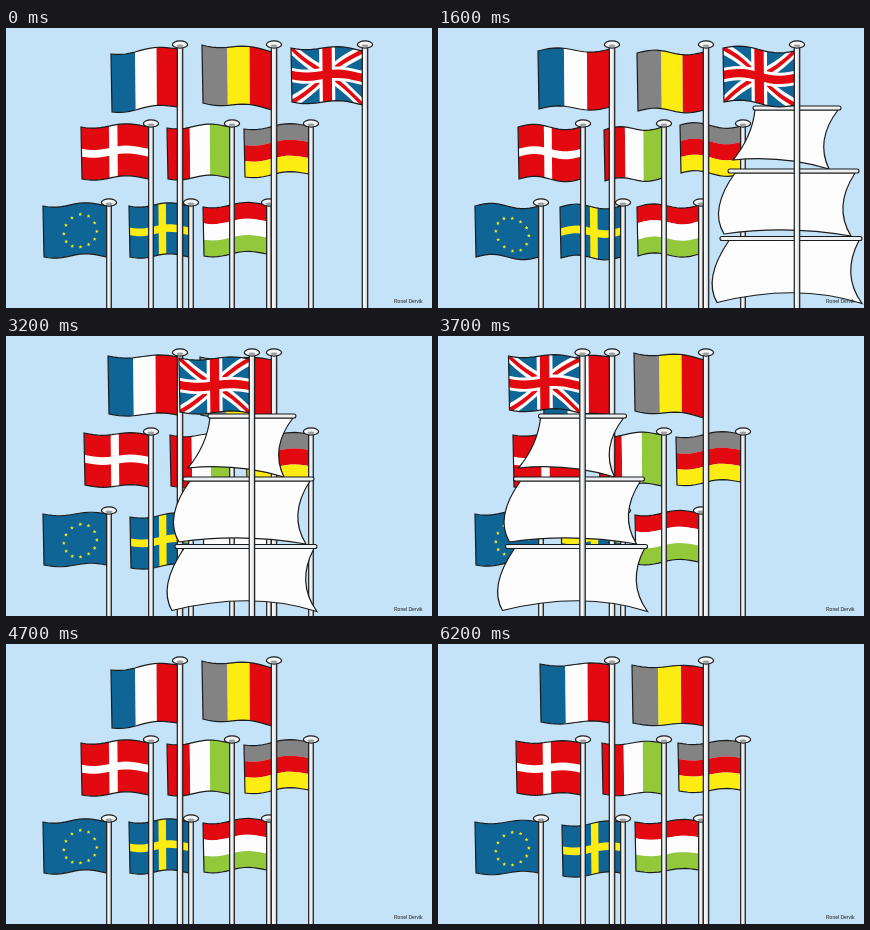
An HTML page with a canvas that plays this animation: 426 by 280 pixels, repeating every 6.3 s.

```html
<!DOCTYPE html>
<html lang="en">
<head>
<meta charset="utf-8">
<title>Flags and ship</title>
<style>
  html, body { margin: 0; width: 100%; height: 100%; overflow: hidden; background: #c4e2f8; }
  canvas { display: block; width: 426px; height: 280px; }
</style>
</head>
<body>
<canvas id="stage" width="426" height="280"></canvas>
<script>
const ctx = document.getElementById('stage').getContext('2d');
const LOOP = 6300, STEP = 100;
const SKY = '#c4e2f8', INK = '#1b1b1b', WHITE = '#fdfdfd', BLUE = '#0f6596', RED = '#e20a10',
      YELLOW = '#fcec12', GRAY = '#838383', GREEN = '#93c83a';

// Three cloth shapes: wave height, phase, slant of the free edge
const POSES = [
  { amp: 2.2, phase: 0.5, skew: 1 },
  { amp: 1.8, phase: 0, skew: 1 },
  { amp: -2.6, phase: 0, skew: 1 }
];

// free: corner of the free end for each pose; drawn from back to front
const FLAGS = [
  { pole: 103, cap: 175, top: 178, h: 51, free: [[37, 178], [37, 178], [37, 178]], art: europe },
  { pole: 185, cap: 175, top: 178, h: 51, free: [[123, 178], [124, 181], [122, 179]], art: f => cross(f, BLUE, YELLOW, 0.49) },
  { pole: 263, cap: 175, top: 177, h: 49, free: [[197, 179], [197, 178], [199, 179]], art: f => rows(f, [RED, WHITE, GREEN]) },
  { pole: 145, cap: 96, top: 99, h: 52, free: [[75, 99], [78, 97], [80, 99]], art: f => cross(f, RED, WHITE, 0.41) },
  { pole: 226, cap: 96, top: 99, h: 51, free: [[161, 100], [164, 99], [166, 102]], art: f => columns(f, [RED, WHITE, GREEN]) },
  { pole: 305, cap: 96, top: 98, h: 48, free: [[238, 101], [240, 99], [242, 97]], art: f => rows(f, [GRAY, RED, YELLOW]) },
  { pole: 174, cap: 17, top: 21, h: 58, free: [[105, 26], [102, 20], [100, 23]], art: f => columns(f, [BLUE, WHITE, RED]) },
  { pole: 268, cap: 17, top: 24, h: 58, free: [[196, 17], [194, 21], [199, 25]], art: f => columns(f, [GRAY, YELLOW, RED]) }
];
const SHIP_FLAG = { pole: 359, cap: 17, top: 23, h: 54, free: [[285, 20], [286, 22], [285, 20]], art: union };

// Yards relative to the mast, with the curves of the sail below
const YARDS = [
  { y: 80, l: -44, r: 44, delay: 0, sail: { tl: -42, belly: [-45, 27], bl: [-64, 50], dip: [-15, 45], br: [32, 59], bend: [18, 30], tr: 41 } },
  { y: 143, l: -69, r: 62, delay: 0, sail: { tl: -62, belly: [-88, 36], bl: [-73, 61], dip: [-10, 52], br: [54, 63], bend: [36, 34], tr: 58 } },
  { y: 210.5, l: -77, r: 65, delay: 65, sail: { tl: -68, belly: [-94, 38], bl: [-80, 62], dip: [0, 42], br: [65, 63], bend: [44, 34], tr: 62 } }
];

const clamp = v => Math.max(0, Math.min(1, v));

function poseAt(t) {
  const p = (t / 890) % 1;
  return p < 0.33 ? 0 : p < 0.61 ? 1 : p < 0.82 ? 2 : p < 0.98 ? 1 : 0;
}

// Maps u (free end to pole) and v (top to bottom) onto the cloth
function cloth(flag, pose) {
  const [x, y] = flag.free[pose], { amp, phase, skew } = POSES[pose];
  const right = flag.pole - 2;
  return (u, v) => {
    const wave = amp * (Math.sin(2 * Math.PI * u + phase) - Math.sin(phase));
    const left = x + skew * v;
    return [left + (right - left) * u, y + (flag.top - y) * u + wave + flag.h * v];
  };
}

function trace(at, pts) {
  ctx.beginPath();
  pts.forEach(([u, v], i) => {
    const [u2, v2] = pts[(i + 1) % pts.length];
    for (let k = 0; k < 14; k++) ctx.lineTo(...at(u + (u2 - u) * k / 14, v + (v2 - v) * k / 14));
  });
  ctx.closePath();
}

function patch(at, color, u0 = 0, v0 = 0, u1 = 1, v1 = 1) {
  trace(at, [[u0, v0], [u1, v0], [u1, v1], [u0, v1]]);
  ctx.fillStyle = color;
  ctx.fill();
}

function columns(at, colors) {
  const edges = [0, 0.36, 0.68, 1];
  colors.forEach((c, i) => patch(at, c, edges[i], 0, edges[i + 1], 1));
}

function rows(at, colors) {
  colors.forEach((c, i) => patch(at, c, 0, i / 3, 1, (i + 1) / 3));
}

function cross(at, field, color, u) {
  patch(at, field);
  patch(at, color, u, 0, u + 0.125, 1);
  patch(at, color, 0, 0.42, 1, 0.57);
}

function europe(at) {
  patch(at, BLUE);
  ctx.fillStyle = YELLOW;
  for (let i = 0; i < 12; i++) {
    const a = i * Math.PI / 6;
    const [x, y] = at(0.58 + 0.26 * Math.sin(a), 0.54 - 0.32 * Math.cos(a));
    ctx.beginPath();
    for (let k = 0; k < 10; k++) {
      const r = k % 2 ? 0.9 : 2, b = k * Math.PI / 5;
      ctx.lineTo(x + r * Math.sin(b), y - r * Math.cos(b));
    }
    ctx.fill();
  }
}

function union(at) {
  const diagonals = (w, color) => {
    for (const s of [0, 1]) {
      trace(at, [[-w, s], [w, s], [1 + w, 1 - s], [1 - w, 1 - s]]);
      ctx.fillStyle = color;
      ctx.fill();
    }
  };
  const plus = (w, color) => {
    patch(at, color, 0.5 - w, 0, 0.5 + w, 1);
    patch(at, color, 0, 0.5 - w * 1.2, 1, 0.5 + w * 1.2);
  };
  patch(at, BLUE);
  diagonals(0.12, WHITE);
  diagonals(0.045, RED);
  plus(0.11, WHITE);
  plus(0.065, RED);
}

function drawFlag(flag, pose) {
  const at = cloth(flag, pose);
  const outline = () => trace(at, [[0, 0], [1, 0], [1, 1], [0, 1]]);
  ctx.save();
  outline();
  ctx.clip();
  flag.art(at);
  ctx.restore();
  outline();
  ctx.strokeStyle = INK;
  ctx.lineWidth = 1.2;
  ctx.stroke();
}

function drawPole(x, cap) {
  const w = cap < 50 ? 5.4 : 4.6;
  ctx.fillStyle = '#f4f6f7';
  ctx.fillRect(x - w / 2, cap, w, 290 - cap);
  ctx.fillStyle = '#d3d8db';
  ctx.fillRect(x + 0.6, cap, w / 2 - 0.6, 290 - cap);
  ctx.strokeStyle = INK;
  ctx.lineWidth = 1.2;
  ctx.strokeRect(x - w / 2, cap, w, 290 - cap);
  ctx.beginPath();
  ctx.ellipse(x, cap - 0.5, 7.6, 3.6, 0, 0, 7);
  ctx.fillStyle = '#f4f6f7';
  ctx.fill();
  ctx.stroke();
  ctx.beginPath();
  ctx.ellipse(x, cap + 0.8, 3.4, 1.4, 0, 0, 7);
  ctx.fillStyle = '#9aa0a4';
  ctx.fill();
}

function drawYard({ y, l, r }, angle) {
  ctx.save();
  ctx.translate(359, y);
  ctx.rotate(-angle);
  ctx.beginPath();
  ctx.roundRect(l, -2, r - l, 4, 2);
  ctx.fillStyle = '#eef1f3';
  ctx.fill();
  ctx.strokeStyle = INK;
  ctx.lineWidth = 1.1;
  ctx.stroke();
  ctx.restore();
}

function drawSail({ y, sail }, open) {
  const { tl, belly, bl, dip, br, bend, tr } = sail;
  const p = (dx, dy) => [359 + dx, y + 2 + dy * open];
  ctx.beginPath();
  ctx.moveTo(...p(tl, 0));
  ctx.quadraticCurveTo(...p(...belly), ...p(...bl));
  ctx.quadraticCurveTo(...p(...dip), ...p(...br));
  ctx.quadraticCurveTo(...p(...bend), ...p(tr, 0));
  ctx.closePath();
  ctx.fillStyle = WHITE;
  ctx.fill();
  ctx.strokeStyle = INK;
  ctx.lineWidth = 1.2;
  ctx.stroke();
}

function drawShip(t, pose) {
  const open = clamp((t - 1300) / 300);
  const run = Math.max(0, t / 1000 - 1.875);
  ctx.save();
  ctx.translate(-64.4 * run * run, 0);
  if (open > 0) [...YARDS].reverse().forEach(yard => drawSail(yard, open));
  if (t > 400) {
    for (const yard of YARDS) drawYard(yard, Math.PI / 2 * (1 - clamp((t - 400 - yard.delay) / 900)));
  }
  drawFlag(SHIP_FLAG, pose);
  drawPole(SHIP_FLAG.pole, SHIP_FLAG.cap);
  ctx.restore();
}

function draw(t) {
  const pose = poseAt(t);
  ctx.fillStyle = SKY;
  ctx.fillRect(0, 0, 426, 280);
  for (const flag of FLAGS) {
    drawFlag(flag, pose);
    drawPole(flag.pole, flag.cap);
  }
  drawShip(t, pose);
  ctx.fillStyle = INK;
  ctx.font = '5px "Liberation Sans", Arial, sans-serif';
  ctx.fillText('Ronel Dervik', 388, 275);
}

const start = performance.now();
function tick() {
  const t = (performance.now() - start) % LOOP;
  draw(Math.floor(t / STEP) * STEP);
  requestAnimationFrame(tick);
}
tick();
</script>
</body>
</html>
```
